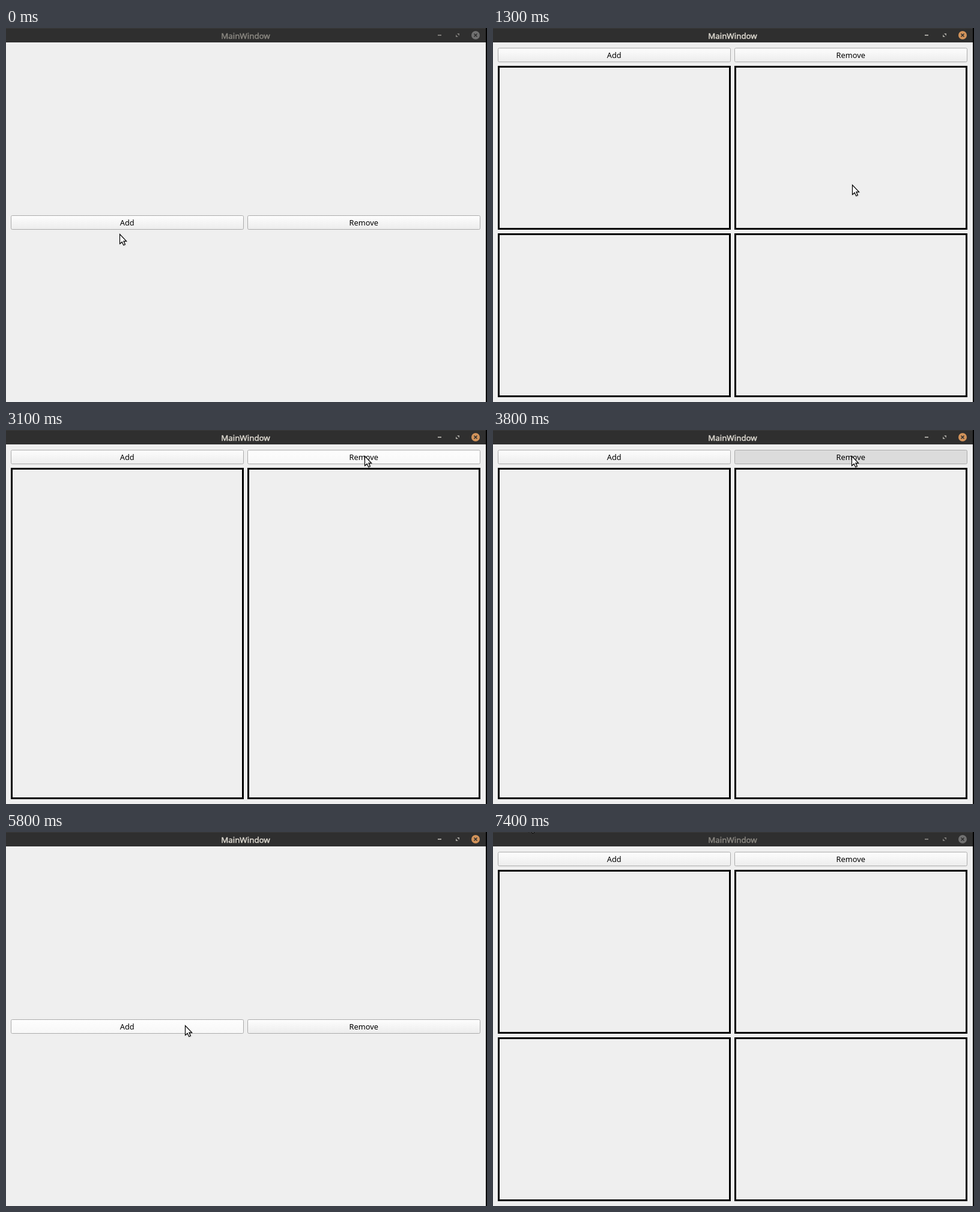
An HTML page with a canvas that plays this animation: 801x623 px, repeating every 7.5 s.

```html
<!DOCTYPE html>
<html lang="en">
<head>
<meta charset="utf-8">
<title>MainWindow</title>
<style>
html, body { margin: 0; width: 100%; height: 100%; overflow: hidden; background: #efefef; }
canvas { display: block; }
</style>
</head>
<body>
<canvas id="stage" width="801" height="623"></canvas>
<script>
const ctx = document.getElementById('stage').getContext('2d');
const LOOP = 7500, STEP = 100;
const MARGIN = 8, GAP = 6, COLUMN = 388, BUTTON_HEIGHT = 24;
const RIGHT = MARGIN + COLUMN + GAP;
const arrow = new Path2D('M0 0V16L3.7 12.7L6.2 18.2L8.8 17L6.4 11.6H11Z');

const point = (x, y) => ({ x, y });
const stroke = (start, end, bend, to) => ({ start, end, bend, to });

// Each pointer gesture is a quadratic curve that begins where the previous one stopped.
const home = point(189, 343), onAdd = point(191, 327), onRemove = point(597, 43);
const gestures = [
  stroke(0, 200, home, onAdd),
  stroke(800, 1400, point(571, 317), point(625, 236)),
  stroke(1500, 2300, point(615, 110), onRemove),
  stroke(4800, 5800, point(339, 585), point(298, 322)),
  stroke(6100, 6500, point(304, 360), point(338, 399)),
  stroke(6500, 7200, point(460, 390), point(59, -17))
];

const addClicks = [400, 6000];
const removeClicks = [0, 1, 2].map(i => 3000 + 800 * i);

function pointerAt(time) {
  let from = home;
  for (const { start, end, bend, to } of gestures) {
    if (time < start) break;
    const k = Math.min(1, (time - start) / (end - start));
    const along = axis => Math.round(
      (1 - k) ** 2 * from[axis] + 2 * k * (1 - k) * bend[axis] + k * k * to[axis]);
    from = point(along('x'), along('y'));
  }
  return from;
}

// Adding fills the grid with four panels; every removal halves them.
function panelCountAt(time) {
  const [firstAdd, secondAdd] = addClicks;
  if (time <= firstAdd) return 0;
  return time > secondAdd ? 4 : 4 >> removeClicks.filter(click => time > click).length;
}

function rect(x, y, w, h, color) {
  ctx.fillStyle = color;
  ctx.fillRect(x, y, w, h);
}

function text(string, x, y, color, size, embolden = 0) {
  ctx.font = size + 'px "Noto Sans", "Open Sans", sans-serif';
  ctx.textAlign = 'center';
  ctx.fillStyle = ctx.strokeStyle = color;
  ctx.fillText(string, x, y);
  if (!embolden) return;
  ctx.lineWidth = embolden;
  ctx.strokeText(string, x, y);
}

function drawTitleBar(active) {
  rect(0, 0, 799, 24, '#2f2f2f');
  rect(0, 0, 799, 1, '#3a3a3a');
  text('MainWindow', 399, 18, active ? '#dfdbd2' : '#8b8882', 13.3, 0.45);

  const glyph = active ? '#a5a39e' : '#7d7b78';
  rect(719, 11, 6, 2, glyph);
  ctx.fillStyle = glyph;
  ctx.fill(new Path2D('M755 9h-4l4 4ZM749 15h4l-4 -4Z'));

  ctx.fillStyle = active ? '#d2935a' : '#707070';
  ctx.beginPath();
  ctx.arc(782, 12, 7, 0, Math.PI * 2);
  ctx.fill();
  ctx.strokeStyle = '#2f2f2f';
  ctx.lineWidth = 1.6;
  ctx.stroke(new Path2D('M779.5 9.5l5 5m0 -5l-5 5'));
}

function drawButton(label, x, y, pointer, pressing) {
  const hover = pointer.x >= x && pointer.x < x + COLUMN
    && pointer.y >= y && pointer.y < y + BUTTON_HEIGHT;
  const face = ctx.createLinearGradient(0, y, 0, y + BUTTON_HEIGHT);
  face.addColorStop(0, '#fefefe');
  face.addColorStop(1, hover ? '#f7f7f7' : '#ececec');
  ctx.beginPath();
  ctx.roundRect(x + 0.5, y + 0.5, COLUMN - 1, BUTTON_HEIGHT - 1, 2);
  ctx.fillStyle = hover && pressing ? '#dcdcdc' : face;
  ctx.fill();
  ctx.strokeStyle = '#ababab';
  ctx.lineWidth = 1;
  ctx.stroke();
  text(label, x + COLUMN / 2 - 0.3, y + 17, '#000', 12.8);
}

function drawPanels(count) {
  const width = count === 1 ? 2 * COLUMN + GAP : COLUMN;
  const height = count === 4 ? 273 : 552;
  ctx.strokeStyle = '#000';
  ctx.lineWidth = 3;
  for (let i = 0; i < count; i++) {
    const x = i % 2 ? RIGHT : MARGIN, y = i < 2 ? 63 : 342;
    ctx.strokeRect(x + 1.5, y + 1.5, width - 3, height - 3);
  }
}

function drawPointer({ x, y }) {
  ctx.save();
  ctx.translate(x + 0.5, y + 0.5);
  ctx.shadowColor = 'rgba(0,0,0,.3)';
  ctx.shadowBlur = 2;
  ctx.shadowOffsetX = ctx.shadowOffsetY = 1;
  ctx.fillStyle = '#fff';
  ctx.fill(arrow);
  ctx.shadowColor = 'transparent';
  ctx.strokeStyle = '#000';
  ctx.lineWidth = 1.2;
  ctx.stroke(arrow);
  ctx.restore();
}

function draw(now) {
  const time = Math.floor(now % LOOP / STEP) * STEP;
  const pointer = pointerAt(time);
  const count = panelCountAt(time);
  const pressing = [...addClicks, ...removeClicks].includes(time);
  const buttonY = count ? 33 : 312;

  rect(0, 0, 801, 623, '#efefef');
  rect(799, 0, 2, 623, '#000');
  drawTitleBar(time >= addClicks[0] && time < 7400);
  drawButton('Add', MARGIN, buttonY, pointer, pressing);
  drawButton('Remove', RIGHT, buttonY, pointer, pressing);
  drawPanels(count);
  drawPointer(pointer);
  requestAnimationFrame(draw);
}
requestAnimationFrame(draw);
</script>
</body>
</html>
```
